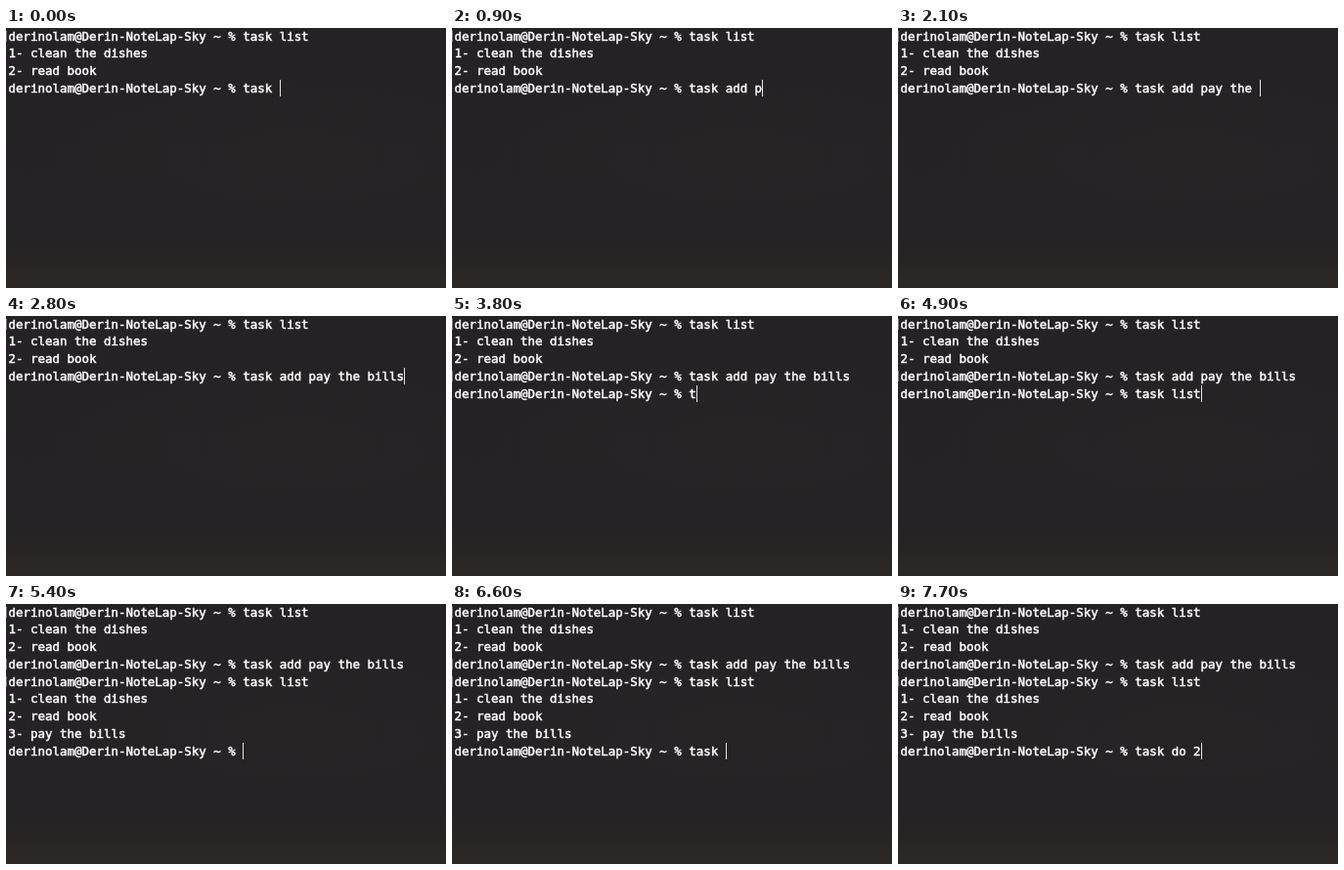
An HTML page that plays this animation: 450 px wide and 266 px high, repeating every 8 s.

```html
<!DOCTYPE html>
<html lang="en">
<head>
<meta charset="utf-8">
<title>Task list in a terminal</title>
<style>
  html, body {
    margin: 0;
    width: 100%;
    height: 100%;
    overflow: hidden;
  }
  #term {
    --row: 17.75px;
    position: relative;
    width: 450px;
    height: 266px;
    overflow: hidden;
    color: #fff;
    font: 12.44px/var(--row) "DejaVu Sans Mono", monospace;
    font-variant-ligatures: none;
    -webkit-text-stroke: .5px #fff;
    background:
      radial-gradient(ellipse 260px 90px at 300px 130px, #29262780, #29262700),
      linear-gradient(#242224 0, #252325 215px, #272524 240px, #2b2825 256px, #292624 266px);
  }
  .line {
    position: absolute;
    left: 2.6px;
    top: calc(var(--n) * var(--row) - .5px);
    white-space: pre;
  }
  .mark::before {
    content: "";
    position: absolute;
    left: -2.6px;
    top: 3px;
    width: 1px;
    height: 11px;
    background: #737174;
  }
  #cursor {
    position: absolute;
    left: calc(2.8px + var(--col) * 1ch);
    top: calc(var(--n) * var(--row) - .5px);
    width: 1px;
    height: 17.5px;
    background: #e6e6e6;
  }
</style>
</head>
<body>
<div id="term"><div id="cursor"></div></div>
<script>
const LOOP = 8000;
const PROMPT = 'derinolam@Derin-NoteLap-Sky ~ % ';
const TASKS = ['1- clean the dishes', '2- read book', '3- pay the bills'];

// Each command: text already there, typed text, time of each key, time of return, output.
const commands = [
  { given: 'task list', typed: '', keys: [], enter: 0, output: TASKS.slice(0, 2) },
  { given: 'task ', typed: 'add pay the bills', enter: 3300, output: [],
    keys: [100, 200, 400, 600, 900, 1000, 1300, 1300, 1700, 1900, 2000, 2100, 2300, 2400, 2600, 2700, 2800] },
  { given: '', typed: 'task list', enter: 5400, output: TASKS,
    keys: [3800, 4000, 4100, 4200, 4300, 4500, 4700, 4700, 4900] },
  { given: '', typed: 'task do 2', enter: LOOP, output: [],
    keys: [6100, 6200, 6300, 6500, 6600, 7000, 7100, 7200, 7700] }
];

const term = document.getElementById('term');
const cursor = document.getElementById('cursor');
const rows = Array.from({ length: 9 }, (_, n) => {
  const row = document.createElement('div');
  row.style.setProperty('--n', n);
  term.append(row);
  return row;
});

function screenAt(t) {
  const lines = [];
  for (const { given, typed, keys, enter, output } of commands) {
    const count = keys.filter(k => k <= t).length;
    const done = t >= enter;
    lines.push({ text: PROMPT + given + typed.slice(0, count), mark: done });
    if (!done) break;
    lines.push(...output.map(text => ({ text, mark: false })));
  }
  return lines;
}

function draw(t) {
  const lines = screenAt(t);
  rows.forEach((row, n) => {
    const { text, mark } = lines[n] || { text: '', mark: false };
    if (row.textContent !== text) row.textContent = text;
    row.className = mark ? 'line mark' : 'line';
  });
  cursor.style.setProperty('--n', lines.length - 1);
  cursor.style.setProperty('--col', lines[lines.length - 1].text.length);
}

let start;
function tick(now) {
  start ??= now;
  draw((now - start) % LOOP);
  requestAnimationFrame(tick);
}
draw(0);
requestAnimationFrame(tick);
</script>
</body>
</html>
```
